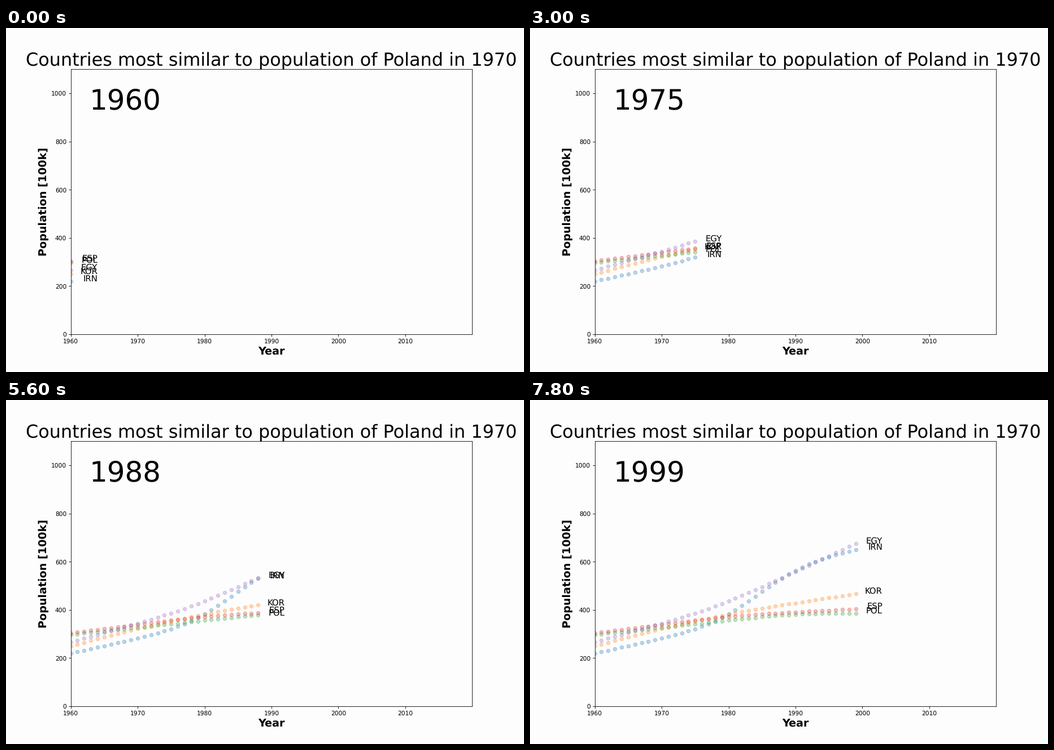
Recreate the animation shown at these times as a matplotlib script. Size 917x611 px, loop 8000 ms.

```python
import numpy as np
import matplotlib.pyplot as plt
from matplotlib.animation import FuncAnimation

plt.rcParams["text.hinting"] = "no_hinting"

DPI = 76.375
FIRST, COUNT = 1960, 40
BACK = "#fdfdfd"
years = np.arange(FIRST, FIRST + COUNT)
t = years - FIRST


def trend(start, slope, *bends):
    """Straight growth whose slope eases by `change` around a given year."""
    pop = start + slope * t
    for change, year, width in bends:
        pop = pop + change * width * np.log1p(np.exp((years - year) / width))
    return pop


# Population in units of 100k
series = [
    ("IRN", "tab:blue", trend(219, 6.2, (15.8, 1978.5, 2.5), (-15.8, 1990.5, 2.5))),
    ("KOR", "tab:orange", trend(251.4, 7.65, (-3.6, 1976, 6))),
    ("POL", "tab:green", trend(296.4, 3, (-3, 1989.8, 2.5))),
    ("ESP", "tab:red", trend(304, 3.5, (-2.03, 1981, 2))),
    ("EGY", "tab:purple", trend(266, 7.7, (5.3, 1978.3, 3))),
]

fig, ax = plt.subplots(figsize=(12.00655, 8), dpi=DPI, facecolor=BACK)
ax.set_facecolor(BACK)
ax.set_xlim(1960, 2020)
ax.set_ylim(0, 1100)
ax.set_xticks(range(1960, 2020, 10))
ax.set_yticks(range(0, 1100, 200))
ax.set_title("Countries most similar to population of Poland in 1970",
             fontsize=30)
ax.set_xlabel("Year", fontsize=18, fontweight="bold")
ax.set_ylabel("Population [100k]", fontsize=18, fontweight="bold")

counter = ax.text(0.0465, 0.85, "", fontsize=47, transform=ax.transAxes)
tracks = []
for name, color, pop in series:
    dots, = ax.plot([], [], "o", color=color, alpha=0.3)
    label = ax.text(FIRST, 0, name, fontsize=14, ha="right")
    tracks.append((dots, label, pop))


def draw(i):
    counter.set_text(str(years[i]))
    for dots, label, pop in tracks:
        dots.set_data(years[:i + 1], pop[:i + 1])
        label.set_position((years[i] + 4, pop[i]))
    return [counter]


anim = FuncAnimation(fig, draw, frames=COUNT, interval=200, repeat=True,
                     init_func=lambda: draw(0))
plt.show()
```
